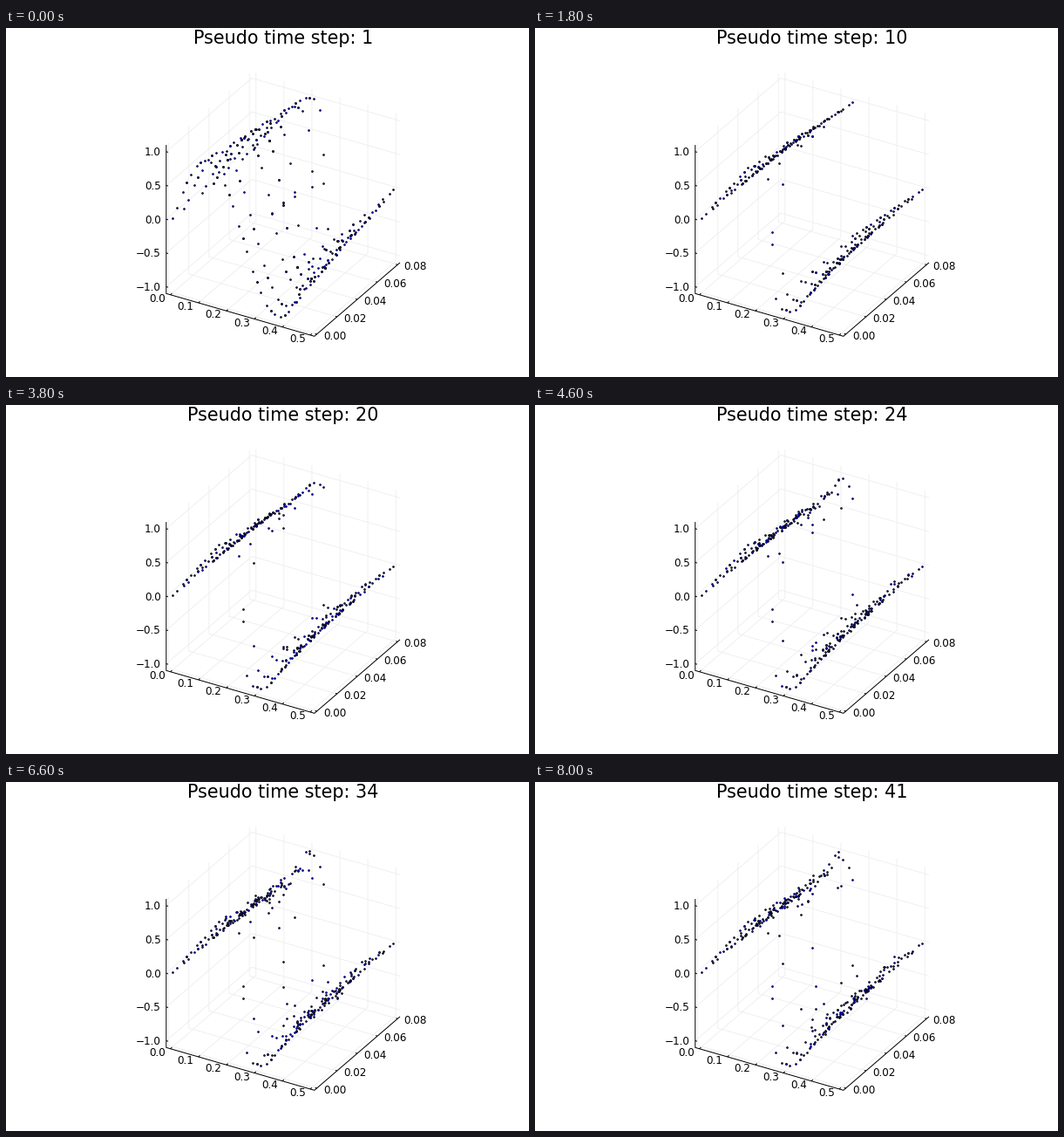
Recreate the animation shown at these times as a matplotlib script. Size 600 px wide and 400 px high, loop 8.2 s.

```python
import numpy as np
import matplotlib.pyplot as plt
from matplotlib.animation import FuncAnimation

W, H, DPI = 600, 400, 100
STEPS = 41
PX = 72 / DPI

plt.rcParams["font.family"] = "DejaVu Sans"
fig = plt.figure(figsize=(W / DPI, H / DPI), dpi=DPI, facecolor="white")
ax = fig.add_axes([0, 0, 1, 1])
ax.set_xlim(0, W)
ax.set_ylim(H, 0)
ax.axis("off")

# Screen vectors of the unit box: position s, time t, value u
ORIGIN = np.array([191.4, 218.2])
VS, VT, VU = np.array([160.4, 46.2]), np.array([92.6, -79.6]), np.array([0, -77.4])
PAD, U_PAD = 0.03, 1.1


def project(s, t, u):
    s, t, u = (np.asarray(v, float)[..., None] for v in (s, t, u))
    return ORIGIN + s * VS + t * VT + u * VU


def path(*pts, color="black", lw=1.0, z=1):
    p = np.array([project(*q) for q in pts])
    ax.plot(p[:, 0], p[:, 1], color=color, lw=lw * PX, zorder=z,
            solid_capstyle="butt")


def label(x, y, text, ha, size=12):
    return ax.text(x, y, text, ha=ha, va="baseline", fontsize=size * PX)


def draw_box():
    lo, hi = -PAD, 1 + PAD
    grid = dict(color="#ededed", lw=0.8, z=0)
    for k in range(6):
        s = k / 5
        path((s, lo, -U_PAD), (s, hi, -U_PAD), (s, hi, U_PAD), **grid)
        path((s, lo, -U_PAD), (s, lo + 0.02, -U_PAD))
        x, y = project(s, lo, -U_PAD)
        label(x - 14.6, y + 8.2, f"{s / 2:.1f}", "center")
    for k in range(5):
        t = k / 4
        path((hi, t, -U_PAD), (lo, t, -U_PAD), (lo, t, U_PAD), **grid)
        path((hi, t, -U_PAD), (hi - 0.012, t, -U_PAD))
        x, y = project(hi, t, -U_PAD)
        label(x + 7.2, y + 6, f"{t * 0.08:.2f}", "left")
    for u in np.linspace(-1, 1, 5):
        path((lo, lo, u), (lo, hi, u), (hi, hi, u), **grid)
        path((lo, lo, u), (lo + 0.013, lo, u))
        x, y = project(lo, lo, u)
        label(x - 6, y + 4.4, f"{u:.1f}".replace("-", "\u2212"), "right")
    path((lo, lo, U_PAD), (lo, lo, -U_PAD), (hi, lo, -U_PAD), (hi, hi, -U_PAD))


# Cubic Gauss-Lobatto nodes on 10 x 2 elements
LOBATTO = np.array([0, 0.2764, 0.7236, 1])
s_nodes = (np.arange(10)[:, None] + LOBATTO).ravel() / 10
t_nodes = (np.arange(2)[:, None] + LOBATTO).ravel() / 2
S, T = np.meshgrid(s_nodes, t_nodes, indexing="ij")
SIDE = np.where(np.arange(40) < 20, 1, -1)[:, None]
M = np.minimum(S, 1 - S)
GAP = 0.5 - M
SPEED = 0.16


def smooth_wave():
    """Sine wave carried along characteristics, by bisection."""
    a, b = np.zeros_like(M), np.ones_like(M)
    for _ in range(40):
        u = (a + b) / 2
        high = u > np.sin(2 * np.pi * (M - SPEED * T * u))
        a, b = np.where(high, a, u), np.where(high, u, b)
    return np.where(GAP < 1e-4, 0.21 * T ** 4, a)


def shock_wave():
    """Straight ramps with a jump at mid-span, softened near t = 0."""
    ramp = np.minimum(M / (0.345 + SPEED * T), 1)
    return ramp * (1 - 0.91 * np.exp(-GAP / 0.0143 - (T / 0.14) ** 2))


# Instability: ringing at the final time, dips by the shock, overall ripple
SETTLED, DRIFT = 17, 6
rng = np.random.default_rng(4)
SETS = 5
RING = 10 * T ** 8 * M ** 4 * np.sin(2 * np.pi * (0.455 - M) / 0.4)
DIP_AREA = np.exp(-GAP / 0.05) * np.sin(np.pi * T)
DIPS = np.minimum(rng.exponential(0.42, (SETS, *S.shape)), 1.25) - 0.1
RIPPLES = rng.normal(0, 0.05, (SETS, *S.shape)) * np.minimum(4 * M, 1) * np.minimum(3 * T, 1)
NOISE = RIPPLES - DIPS * DIP_AREA

START, SHOCK = smooth_wave(), shock_wave()


def field(step):
    p = min((step - 1) / 4, 1)
    u = START + (SHOCK - START) * (1 - (1 - p) ** 2)
    if step > SETTLED:
        k, f = divmod((step - SETTLED) / DRIFT, 1)
        k = int(k)
        noise = NOISE[k] if f == 0 else (1 - f) * NOISE[k] + f * NOISE[k + 1]
        u = u + min((step - SETTLED) / 11, 1) * (RING + noise)
    return SIDE * u


draw_box()
title = label(318, 18.5, "", "center", 20.8)
dots = ax.scatter(np.zeros(S.size), np.zeros(S.size), s=(1.8 * PX) ** 2,
                  facecolor="#0000ff", edgecolor="black",
                  linewidth=0.75 * PX, zorder=3)


def update(i):
    step = i + 1
    title.set_text(f"Pseudo time step: {step}")
    dots.set_offsets(project(S, T, field(step)).reshape(-1, 2))
    return dots, title


anim = FuncAnimation(fig, update, frames=STEPS, interval=200,
                     repeat=True, repeat_delay=0)
plt.show()
```
